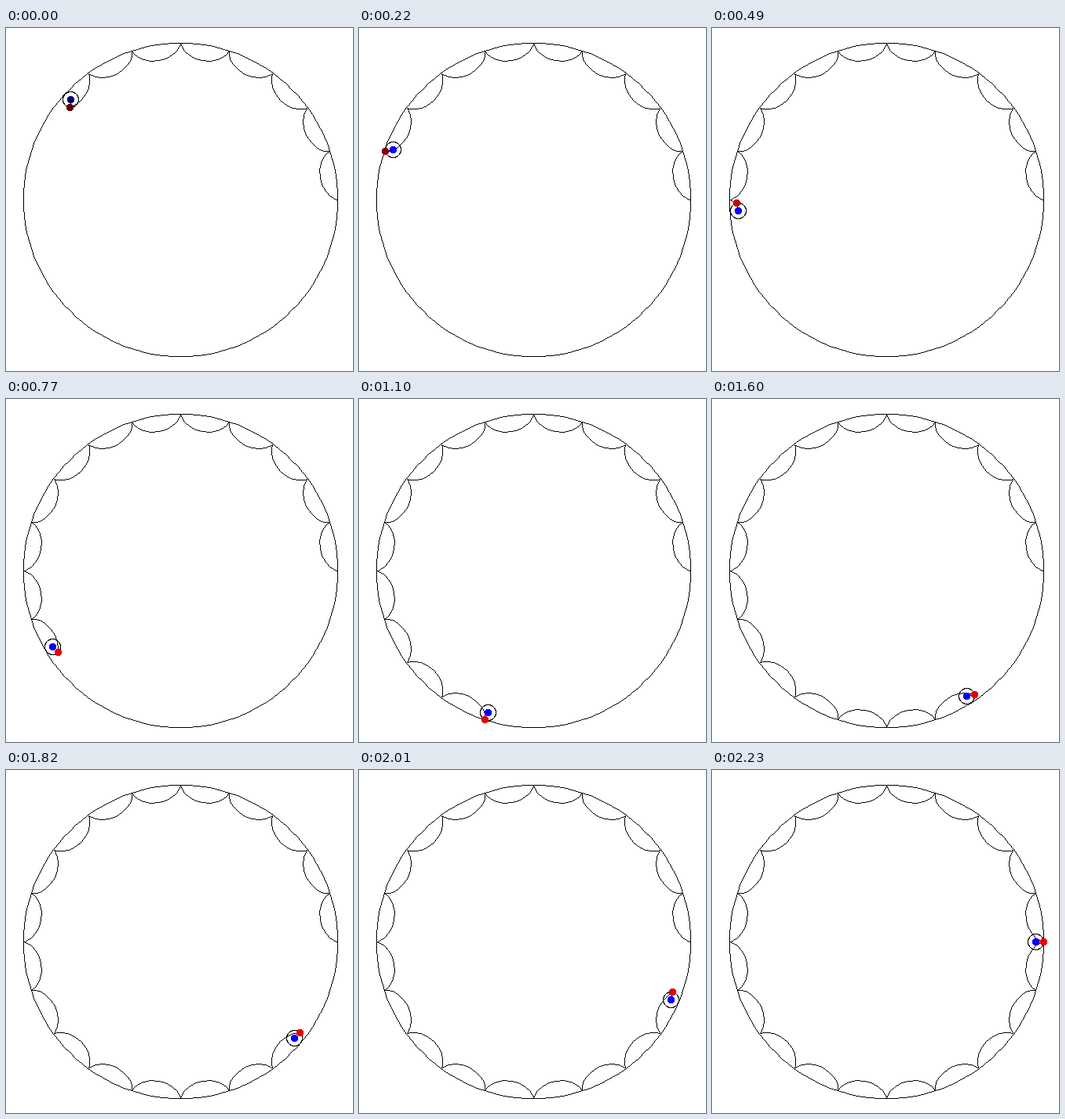
An HTML page with a canvas for the animation above (2330 ms loop, 442x438 px).

```html
<!DOCTYPE html>
<html lang="en">
<head>
<meta charset="utf-8">
<title>Rolling circle</title>
<style>
  html, body { margin: 0; width: 100%; height: 100%; overflow: hidden; background: #fff; }
  canvas { display: block; }
</style>
</head>
<body>
<canvas id="stage" width="442" height="438"></canvas>
<script>
const LOOP = 2330, STEP = 29, CX = 222, CY = 219, R = 200, r = 10, DOT = 4.5;

// The uneven roll: time in ms, angle in degrees
const roll = [[0, 137.6], [220, 160.3], [770, 210.8], [1100, 252.2],
              [1600, 302.5], [2010, 337], [2230, 360], [LOOP, 360]];

const ctx = document.getElementById('stage').getContext('2d');
const plot = (x, y) => ctx.fillRect(x, y, 1, 1);

// Polar offset with y pointing down
function polar([x, y], radius, deg) {
  const a = deg * Math.PI / 180;
  return [x + radius * Math.cos(a), y - radius * Math.sin(a)];
}
const hubAt = deg => polar([CX, CY], R - r, deg);
const penAt = deg => polar(hubAt(deg), r, -deg * (R - r) / r);

// One-pixel line without smoothing
function line(from, to) {
  const [x0, y0] = from.map(Math.round), [x1, y1] = to.map(Math.round);
  const n = Math.max(Math.abs(x1 - x0), Math.abs(y1 - y0), 1);
  for (let i = 0; i <= n; i++) {
    plot(Math.round(x0 + (x1 - x0) * i / n), Math.round(y0 + (y1 - y0) * i / n));
  }
}

function curve(pointAt, end, step) {
  for (let d = 0; d < end; d += step) {
    line(pointAt(d), pointAt(Math.min(d + step, end)));
  }
}

function disc(center, color) {
  const [x, y] = center.map(Math.round);
  ctx.fillStyle = color;
  for (let dy = -4; dy <= 4; dy++) {
    const half = Math.floor(Math.sqrt(DOT * DOT - dy * dy));
    ctx.fillRect(x - half, y + dy, 2 * half + 1, 1);
  }
}

// Equal small steps between the points of the roll
function angleAt(time) {
  const i = roll.findIndex(([t]) => t > time);
  const [t0, a0] = roll[i - 1], [t1, a1] = roll[i];
  const steps = Math.round((t1 - t0) / STEP);
  const done = Math.floor((time - t0) / (t1 - t0) * steps + 1e-6);
  return a0 + (a1 - a0) * done / steps;
}

function draw(time) {
  const angle = angleAt(time), hub = hubAt(angle), pen = penAt(angle);
  ctx.fillStyle = '#fff';
  ctx.fillRect(0, 0, 442, 438);
  ctx.fillStyle = '#000';
  curve(d => polar([CX, CY], R, d), 360, 3);
  curve(penAt, angle, 1.5);
  curve(d => polar(hub.map(Math.round), r, d), 360, 2);
  line(hub, pen);

  // Both dots brighten at the beginning
  disc(hub, `rgb(0,0,${Math.min(255, 112 + time * 0.65)})`);
  disc(pen, `rgb(${Math.min(230, 90 + time * 0.22)},0,0)`);
}

const start = performance.now();
function tick() {
  draw((performance.now() - start) % LOOP);
  requestAnimationFrame(tick);
}
tick();
</script>
</body>
</html>
```
